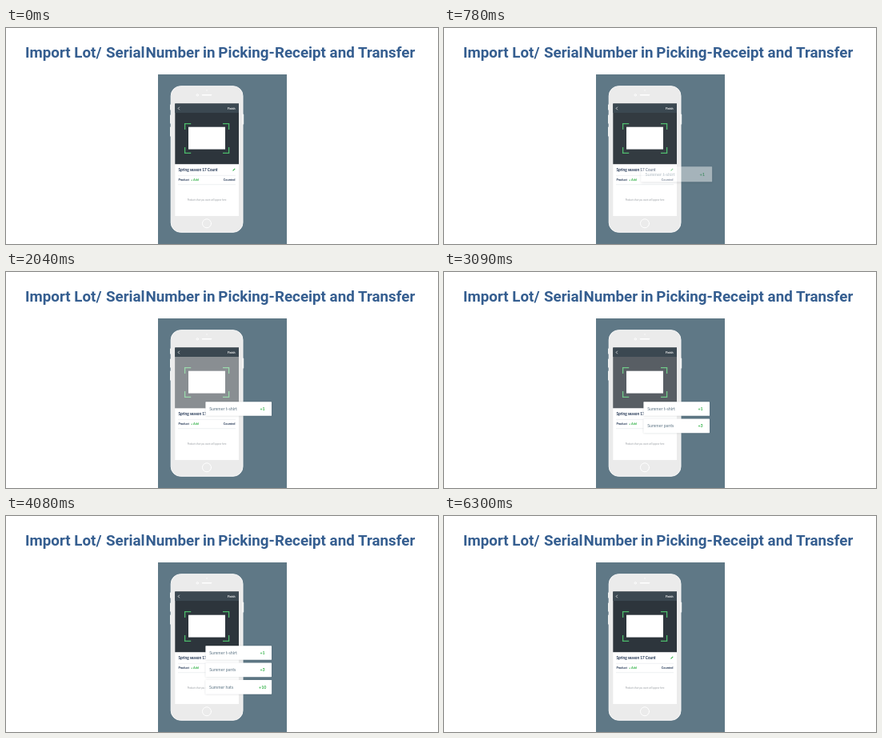
An HTML page that plays this animation: 540x270 px, repeating every 6330 ms.

```html
<!DOCTYPE html>
<html lang="en">
<head>
<meta charset="utf-8">
<title>Import lot and serial numbers</title>
<style>
  html, body { margin: 0; width: 100%; height: 100%; overflow: hidden; background: #fff; }
  svg { display: block; width: 540px; height: 270px; }
  text { font-family: Lato, "Open Sans", sans-serif; }
  .title { font: 600 18.8px Roboto, Inter, sans-serif; fill: #355e90; }
  .navy { font-weight: 700; fill: #1d3150; }
  .green { font-weight: 700; fill: #35b24a; }
  .item { font-size: 5.3px; fill: #5f7686; }
  .line { fill: none; stroke-linecap: round; }
</style>
</head>
<body>
<svg id="stage" viewBox="0 0 540 270">
  <defs>
    <filter id="soft" x="-20%" y="-60%" width="140%" height="220%">
      <feGaussianBlur stdDeviation="1.3"/>
    </filter>
  </defs>
  <text class="title" x="24" y="37">Import Lot/<tspan x="125">Serial</tspan> <tspan x="174.5">Number</tspan> <tspan x="246">in</tspan> <tspan x="265.3">Picking-</tspan></text>
  <text class="title" x="511.3" y="37" text-anchor="end">Receipt and Transfer</text>
  <rect x="190" y="58" width="161" height="212" fill="#5f7886"/>

  <!-- phone -->
  <path class="line" stroke="#f1f2f2" stroke-width="1.2" d="M205.6 96v6M205.6 109v10M205.6 124v11M296.6 108v12"/>
  <rect x="206.2" y="72.7" width="89.8" height="182.6" rx="12" fill="#ebebeb" stroke="#f8f8f8"/>
  <g class="line" stroke="#fff">
    <circle cx="251" cy="78" r=".7" fill="#fff" stroke="none"/>
    <circle cx="239.3" cy="83.8" r="1.2" stroke-width=".9"/>
    <path d="M245.5 83.8h11" stroke-width="1.6"/>
    <circle cx="251" cy="244.3" r="5.5" stroke-width="1"/>
  </g>

  <!-- screen -->
  <rect x="211.3" y="94.5" width="79.7" height="140.5" fill="#fff"/>
  <rect x="211.3" y="94.5" width="79.7" height="75.7" fill="#2d353c"/>
  <rect x="211.3" y="94.5" width="79.7" height="11.5" fill="#3b4851"/>
  <path class="line" stroke="#fff" stroke-width=".7" d="M216.6 99l-1.4 1.5 1.4 1.5"/>
  <text x="286.5" y="101.9" font-size="3.6" font-weight="700" fill="#fff" text-anchor="end">Finish</text>
  <rect x="228" y="123.7" width="46" height="27.9" fill="#fff"/>
  <path fill="none" stroke="#4cbb6b" stroke-width="1.3" d="M223.6 127v-7.4h7.6M271 119.6h7.6v7.4M278.6 149v7.4h-7.6M231.2 156.4h-7.6v-7.4"/>
  <rect id="flash" x="211.3" y="106" width="79.7" height="64.2" fill="#fff" opacity="0"/>

  <text class="navy" x="215.4" y="178.7" font-size="4.7">Spring season 17 Count</text>
  <path class="line" stroke="#35b24a" stroke-width="1.1" d="M283.9 178.2l2-2"/>
  <path stroke="#e3e6e9" stroke-width=".6" d="M215 184.3h72M215 195.7h72"/>
  <text class="navy" x="215.4" y="191.3" font-size="3.85">Product</text>
  <text class="green" x="231" y="191.3" font-size="3.85">+ Add</text>
  <text class="navy" x="286.5" y="191.3" font-size="3.85" text-anchor="end">Counted</text>
  <text x="251" y="215.7" font-size="2.75" fill="#9a9fa4" text-anchor="middle">Products that you count will appear here</text>

  <g id="cards"></g>
</svg>
<script>
const LOOP = 6330;
const CX = 290.7;
const W = 82.6, H = 17.7;
const EXIT = 5845, EXIT_GAP = 70, EXIT_TIME = 300;

const items = [
  { name: "Summer t-shirt", count: "+1", y: 171, scan: 285 },
  { name: "Summer pants", count: "+3", y: 192.3, scan: 1665 },
  { name: "Summer hats", count: "+10", y: 213.8, scan: 2985 }
];

const linear = p => p;
const easeOut = p => 1 - (1 - p) ** 2;
const easeInOut = p => p * p * (3 - 2 * p);

// Rows are [time, value, easing towards this value], in ms after a scan.
const tracks = {
  flash: [[0, 0], [285, .65, easeInOut], [525, 0, easeInOut]],
  rise: [[435, 14], [680, 0, easeInOut]],
  scale: [[435, 1], [640, 1.15, easeOut], [1140, 1, easeInOut]],
  alpha: [[435, 0], [575, 1, linear]]
};

function sample(rows, t) {
  if (t <= rows[0][0]) return rows[0][1];
  for (let i = 1; i < rows.length; i++) {
    const [t0, v0] = rows[i - 1];
    const [t1, v1, ease] = rows[i];
    if (t < t1) return v0 + (v1 - v0) * ease((t - t0) / (t1 - t0));
  }
  return rows[rows.length - 1][1];
}

function add(parent, tag, attrs, text) {
  const el = document.createElementNS("http://www.w3.org/2000/svg", tag);
  for (const key in attrs) el.setAttribute(key, attrs[key]);
  if (text) el.textContent = text;
  return parent.appendChild(el);
}

const flash = document.getElementById("flash");
const layer = document.getElementById("cards");

for (const item of items) {
  const box = { x: -W / 2, y: -H / 2, width: W, height: H, rx: .6 };
  item.el = add(layer, "g", { opacity: 0 });
  item.shade = add(item.el, "rect", { ...box, fill: "#18242e", filter: "url(#soft)" });
  add(item.el, "rect", { ...box, fill: "#fff" });
  add(item.el, "text", { class: "item", x: -36.5, y: 1.8 }, item.name);
  add(item.el, "text", { class: "green", x: 29.9, y: 1.8, "font-size": 5.3, "text-anchor": "middle" }, item.count);
}

function draw(t) {
  let glow = 0;
  items.forEach((item, i) => {
    const local = t - item.scan;
    const out = Math.min(1, Math.max(0, (t - EXIT - i * EXIT_GAP) / EXIT_TIME));
    const scale = sample(tracks.scale, local);
    const lift = (scale - 1) / .15;
    const y = item.y + sample(tracks.rise, local) - 5 * easeOut(out);
    item.el.setAttribute("transform", `translate(${CX} ${y}) scale(${scale})`);
    item.el.setAttribute("opacity", sample(tracks.alpha, local) * (1 - out));
    item.shade.setAttribute("opacity", .15 + .2 * lift);
    item.shade.setAttribute("transform", `translate(0 ${.4 + 1.4 * lift})`);
    glow = Math.max(glow, sample(tracks.flash, local));
  });
  flash.setAttribute("opacity", glow);
}

const start = performance.now();
function tick(now) {
  draw(Math.max(0, now - start) % LOOP);
  requestAnimationFrame(tick);
}
draw(0);
requestAnimationFrame(tick);
</script>
</body>
</html>
```
